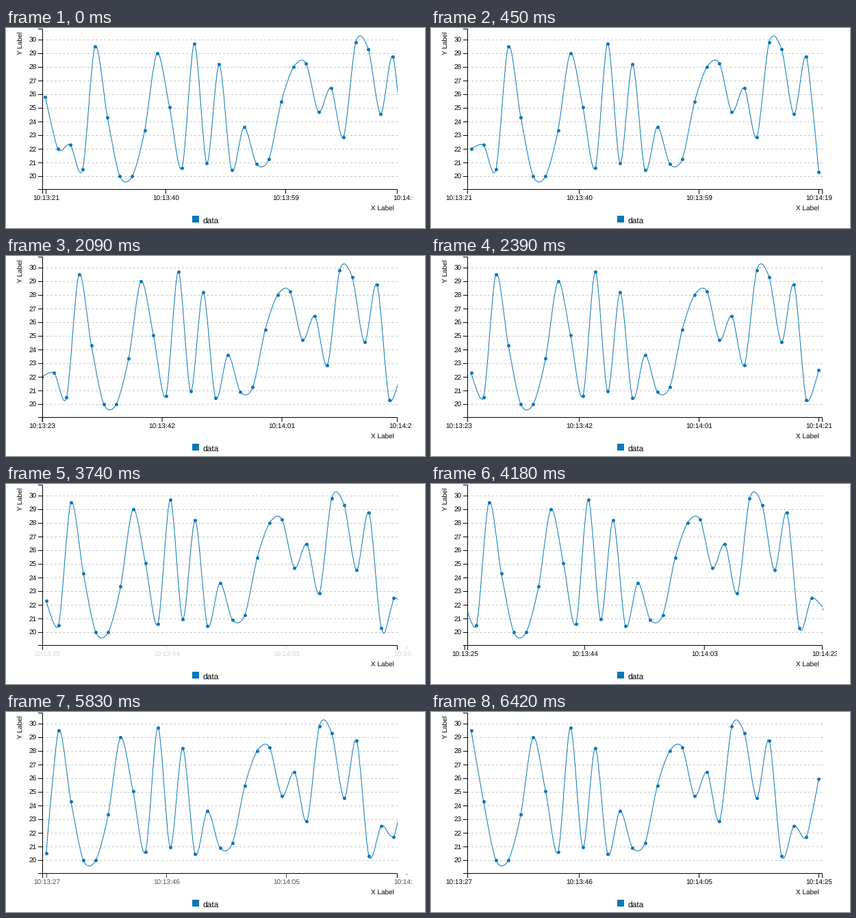
A matplotlib script that plays this animation: 612x293 px, repeating every 8000 ms.

```python
import math

import numpy as np
import matplotlib.pyplot as plt
from matplotlib.animation import FuncAnimation
from matplotlib.patches import PathPatch, Rectangle
from matplotlib.path import Path
from matplotlib.transforms import Bbox, TransformedBbox

W, H, DPI = 612, 293, 100
PX = 72 / DPI                      # one pixel in points
LOOP, STEP = 8000, 20
BLUE, GRID = "#0a78b6", "#c6c6c6"

LEFT, RIGHT, TOP, BASE = 53.5, 571.5, 1.5, 236.5
SHOWN = 29
SPAN = (RIGHT - LEFT) / 1.02       # one percent of padding on each side
FIRST_X, GAP = LEFT + SPAN / 100, SPAN / (SHOWN - 1)
VALUES = np.array([
    25.8, 22.0, 22.3, 20.5, 29.5, 24.3, 20.0, 20.0, 23.35, 29.0, 25.05,
    20.6, 29.7, 20.95, 28.2, 20.45, 23.6, 20.9, 21.25, 25.45, 28.0, 28.25,
    24.7, 26.45, 22.85, 29.8, 29.3, 24.55, 28.75, 20.3, 22.5, 21.7, 25.95])

# Each new value: the axis fades in, then everything slides one gap left.
SLIDES = [-24, 1948, 3954, 5988]
LEAD, FADE, SLIDE = 302, 250, 400
START_CLOCK = (10 * 60 + 13) * 60 + 21
# The picture is refreshed only at these moments.
REFRESH = np.array([
    0, 150, 300, 450, 1800, 1950, 2090, 2240, 2390, 3740, 3890, 4030, 4180,
    4330, 4480, 5830, 5980, 6120, 6270, 6420])

plt.rcParams["font.family"] = "Liberation Sans"
plt.rcParams["text.hinting"] = "no_hinting"


def y_of(v):
    return 17 + (30 - v) * 20


def tick_x(x):
    """Axis ticks sit on whole pixels, rounded up from the axis start."""
    return LEFT + math.ceil(x - LEFT)


def ease(u):
    u = min(max(u, 0), 1)
    return 4 * u ** 3 if u < 0.5 else 1 - 4 * (1 - u) ** 3


def clock(sec):
    return f"{sec // 3600:02d}:{sec // 60 % 60:02d}:{sec % 60:02d}"


def state(t):
    """Cycle number, fade amount and slide amount at time t."""
    k = max(i for i, s in enumerate(SLIDES) if t >= s - LEAD)
    since = t - SLIDES[k]
    return k, ease((since + LEAD) / FADE), min(max(since / SLIDE, 0), 1)


def cardinal(p, blend=1.0):
    """Open cardinal spline, tension 0.7; blend bends in the newest segment."""
    t = 0.15 * (p[2:] - p[:-2])
    n = len(p)
    verts = [p[0], p[1] - t[0] * 2 / 3, p[1]]
    codes = [Path.MOVETO] + [Path.CURVE3] * 2
    for i in range(1, n - 2):
        c2 = p[i + 1] - t[i]
        if i == n - 3:
            old = p[i] + t[i - 1] * 2 / 3
            c2 = old + (c2 - old) * blend
        verts += [p[i] + t[i - 1], c2, p[i + 1]]
        codes += [Path.CURVE4] * 3
    verts += [p[-2] + t[-1] * 2 / 3, p[-1]]
    codes += [Path.CURVE3] * 2
    return Path(verts, codes)


fig = plt.figure(figsize=(W / DPI, H / DPI), dpi=DPI, facecolor="white")
ax = fig.add_axes([0, 0, 1, 1])
ax.set_xlim(0, W)
ax.set_ylim(H, 0)
ax.axis("off")


def stroke(xs, ys, color="black", **kw):
    return ax.plot(xs, ys, color=color, lw=PX, solid_capstyle="butt",
                   solid_joinstyle="miter", snap=False, **kw)[0]


def label(x, y, s, size=10, **kw):
    kw.setdefault("va", "baseline")
    return ax.text(x, y, s, fontsize=size * PX, color="black", **kw)


def clip_box(x0, x1):
    return TransformedBbox(Bbox([[x0, 0], [x1, H]]), ax.transData)


# Static parts
for v in range(20, 31):
    y = math.ceil(y_of(v)) + 0.5
    stroke([53, 572], [y, y], GRID, ls=(0, (3, 3)), dash_capstyle="butt",
           zorder=1)
    stroke([47, 53], [y, y], zorder=4)
    label(44.8, y + 3.5, str(v), ha="right")

stroke([47, LEFT, LEFT, 47], [TOP, TOP, BASE, BASE], zorder=4)
stroke([LEFT, LEFT, RIGHT, RIGHT], [243, BASE, BASE, 243], zorder=4)
label(567, 267, "X Label", ha="right")
label(26, 5, "Y Label", ha="right", va="top", rotation=90)
ax.add_patch(Rectangle((272, 275), 10, 10, fc=BLUE, ec="none"))
label(287.5, 285.5, "data", 12)

# Moving parts
plot_clip = clip_box(53, 572)
axis_clip = clip_box(22, 593)

curve = ax.add_patch(PathPatch(Path([(0, 0), (1, 1)]), fc="none", ec=BLUE,
                               lw=PX, zorder=2))
dots = ax.scatter([], [], s=(5 * PX) ** 2, color=BLUE, lw=0, zorder=3)
marks = [stroke([0, 0], [0, 0], zorder=4) for _ in range(4)]
times = [label(0, 252.5, "", ha="center") for _ in range(4)]
for art in [curve, dots]:
    art.set_clip_box(plot_clip)
for art in marks + times:
    art.set_clip_on(True)
    art.set_clip_box(axis_clip)


def draw(frame):
    now = frame * STEP + STEP / 2
    k, fade, slide = state(REFRESH[REFRESH <= now].max())
    done = slide >= 1
    shift = -GAP * slide

    i = np.arange(int(done), SHOWN + 1)
    pts = np.column_stack([FIRST_X + GAP * i + shift, y_of(VALUES[k + i])])
    curve.set_path(cardinal(pts, 1 if done else fade))
    dots.set_offsets(pts)

    for j, (mark, text) in enumerate(zip(marks, times)):
        x = FIRST_X + GAP * SHOWN * j / 3
        x = tick_x(x + shift) if done else tick_x(x) + shift
        size = 6
        if j == 0 and done:
            size = 0
        elif j == 3 and not done:
            size = 6 * (1 - fade)
        mark.set_data([x, x], [237, 237 + size])
        mark.set_visible(size > 0)
        mark.set_alpha(fade)
        text.set_x(x)
        text.set_text(clock(START_CLOCK + 2 * k + 58 * j // 3))
        text.set_alpha(fade)
    return [curve, dots, *marks, *times]


anim = FuncAnimation(fig, draw, frames=LOOP // STEP, interval=STEP,
                     repeat=True, repeat_delay=0, blit=False)
plt.show()
```
